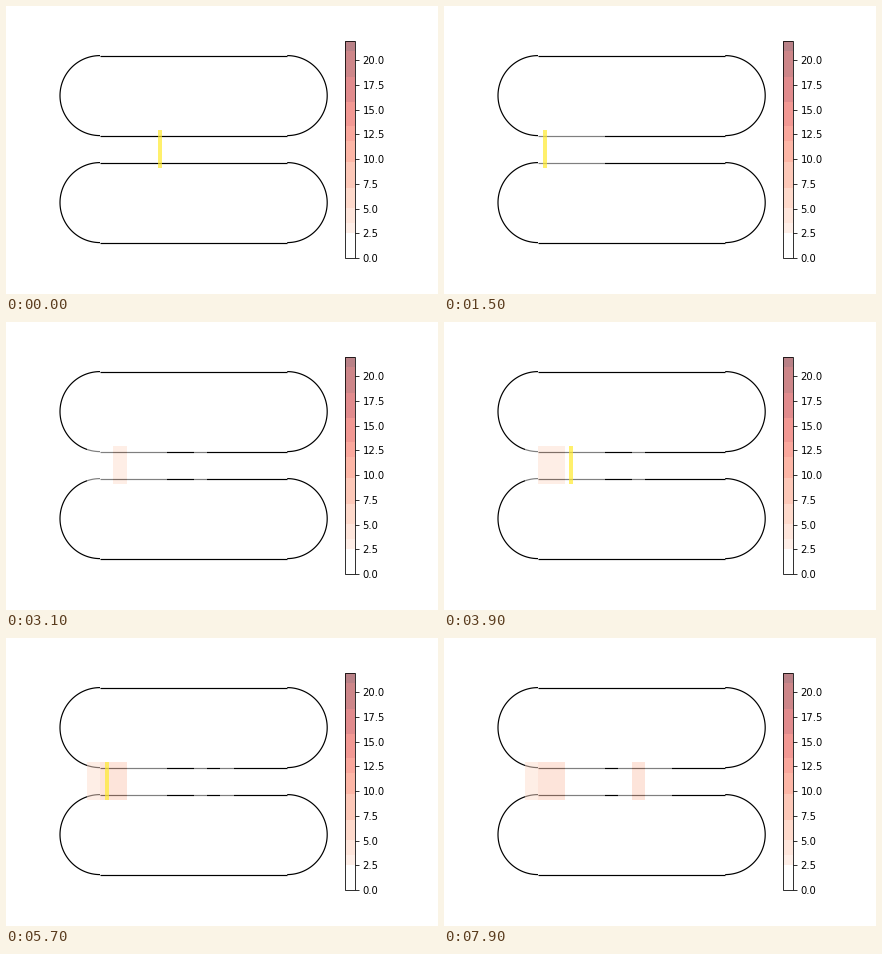
Recreate the animation shown at these times as a matplotlib script. Size 432 by 288 pixels, loop 8000 ms.

```python
import numpy as np
import matplotlib.pyplot as plt
from matplotlib.animation import FuncAnimation
from matplotlib.cm import ScalarMappable
from matplotlib.colors import BoundaryNorm, ListedColormap
from matplotlib.patches import Rectangle

W, H = 432, 288
FRAMES, INTERVAL = 80, 100
LEFT, CELL = 54, 13.36            # left edge of the lanes, cell width
RIGHT = LEFT + 20 * CELL
RADIUS = 40
TOP, BOTTOM = 124, 162            # vertical span of the cells
CELLS = 11

# Cell hit at each event; an event lasts three frames: flash, then two of rest.
HITS = [5, 4, 5, 2, 3, 1, 2, 1, 2, 0, 8, 1, 0, 3,
        8, 10, 0, 4, 2, 1, 2, 8, 8, 8, 9, 7, 9]

LEVELS = [0, 2.5, 3.5, 5.1, 7.1, 9.7, 11.8, 13.4, 15.8, 18.3, 20.9, 22]
mids = (np.array(LEVELS[:-1]) + LEVELS[1:]) / 2
colors = plt.get_cmap("Reds")(mids / LEVELS[-1])
colors[0] = 1
norm = BoundaryNorm(LEVELS, len(colors))

plt.rcParams["font.family"] = "DejaVu Sans"
fig = plt.figure(figsize=(W / 72, H / 72), dpi=72, facecolor="white")
ax = fig.add_axes([0, 0, 1, 1])
ax.set_xlim(0, W)
ax.set_ylim(H, 0)
ax.axis("off")


def cell_x(i):
    return LEFT + (i + 2) * CELL


def add_lane(y):
    style = dict(color="black", lw=1.2, solid_capstyle="butt", zorder=1)
    turn = np.linspace(-np.pi / 2, np.pi / 2, 91)
    x0, x1 = LEFT + RADIUS, RIGHT - RADIUS
    for edge in (y, y + 2 * RADIUS):
        ax.plot([x0, x1], [edge, edge], **style)
    for x, side in ((x0, -1), (x1, 1)):
        ax.plot(x + side * RADIUS * np.cos(turn),
                y + RADIUS + RADIUS * np.sin(turn), **style)


def add_colorbar():
    cax = fig.add_axes([338.58 / W, 36 / H, 10.87 / W, 217.4 / H])
    cmap = ListedColormap(colors[:, :3] * 0.5 + 0.5)
    bar = fig.colorbar(ScalarMappable(norm, cmap), cax=cax,
                       spacing="proportional",
                       ticks=np.arange(0, 21, 2.5), format="%.1f")
    bar.minorticks_off()
    cax.tick_params(labelsize=10)


for lane_y in (49.6, 156.6):
    add_lane(lane_y)
add_colorbar()

heat = [ax.add_patch(Rectangle((cell_x(i), TOP), CELL, BOTTOM - TOP,
                               lw=0, alpha=0.5, zorder=2, visible=False))
        for i in range(CELLS)]
flash, = ax.plot([], [], color="#ffea2e", lw=4, alpha=0.7,
                 solid_capstyle="butt", zorder=3)


def draw(frame):
    event, phase = divmod(frame, 3)
    # The opening flash comes before anything has been counted.
    done = event + 1 if frame else 0
    counts = np.bincount(HITS[:done], minlength=CELLS) if done else [0] * CELLS
    for patch, n in zip(heat, counts):
        patch.set_visible(bool(n))
        patch.set_facecolor(colors[int(norm(n))])
    x = cell_x(HITS[event] + 0.5)
    flash.set_data([x, x], [TOP, BOTTOM])
    flash.set_visible(phase == 0)
    return [*heat, flash]


anim = FuncAnimation(fig, draw, frames=FRAMES, interval=INTERVAL,
                     init_func=lambda: draw(0), repeat=True, repeat_delay=0)
plt.show()
```
